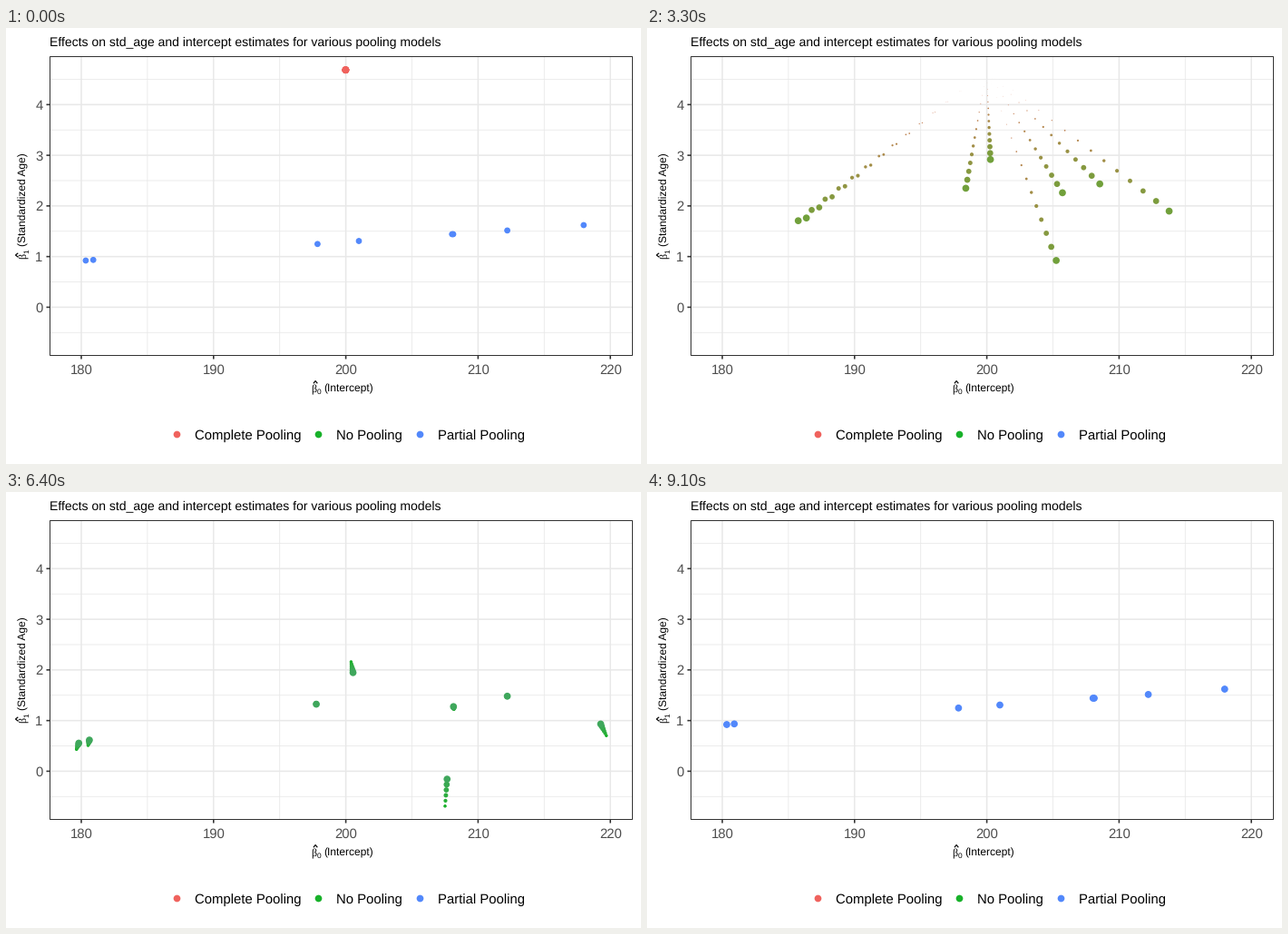
Recreate the animation shown at these times as a matplotlib script. Size 700 px wide and 480 px high, loop 10000 ms.

```python
import numpy as np
import matplotlib.pyplot as plt
from matplotlib.animation import FuncAnimation
from matplotlib.patches import Rectangle

plt.rcParams["text.hinting"] = "none"

W, H, DPI = 700, 480, 100
PX = 72 / DPI               # one pixel in points
FRAMES, STEP = 100, 100     # count, ms
HOLD, MOVE, WAKE = 20, 20, 15
DOT, GAMMA = 7.7, 1.8

RED, GREEN, BLUE = "#F0625D", "#18B12A", "#5288FB"
GRID, DARK, GREY = "#E8E8E8", "#333333", "#4D4D4D"

# Stage positions of the eight groups in each state
COMPLETE = np.tile([374.4, 46.2], (8, 1))
NONE = np.array([(77.7, 283.3), (90.5, 279), (341.6, 232.2), (380.4, 187),
                 (484, 345.8), (493.8, 239.3), (552.6, 225.4), (661.8, 268.2)])
PARTIAL = np.array([(87.9, 256), (96.2, 255.3), (343.4, 237.8), (389, 234.5),
                    (493, 227), (491.7, 227), (552.6, 222.9), (636.8, 217)])

TO_XYZ = np.array([[.4124, .3576, .1805], [.2126, .7152, .0722], [.0193, .1192, .9505]])
WHITE = TO_XYZ.sum(axis=1)


def to_lab(code):
    rgb = np.array([int(code[i:i + 2], 16) for i in (1, 3, 5)]) / 255
    f = np.cbrt(TO_XYZ @ rgb ** GAMMA / WHITE)
    return np.array([116 * f[1] - 16, 500 * (f[0] - f[1]), 200 * (f[1] - f[2])])


def to_rgb(lab):
    fy = (lab[0] + 16) / 116
    f = np.array([fy + lab[1] / 500, fy, fy - lab[2] / 200])
    return np.clip(np.linalg.solve(TO_XYZ, f ** 3 * WHITE), 0, 1) ** (1 / GAMMA)


POINTS = [COMPLETE, NONE, PARTIAL]
LABS = [to_lab(c) for c in (RED, GREEN, BLUE)]


def state(n):
    """Positions and colour of the groups at step n."""
    leg, k = divmod(n, HOLD + MOVE)
    p = max(0, k - HOLD + 1) / MOVE
    nxt = min(leg + 1, 2)
    pos = POINTS[leg] + (POINTS[nxt] - POINTS[leg]) * p
    lab = LABS[leg] + (LABS[nxt] - LABS[leg]) * p
    return pos, to_rgb(lab)


STATES = [state(n) for n in range(FRAMES)]

fig = plt.figure(figsize=(W / DPI, H / DPI), dpi=DPI, facecolor="white")
ax = fig.add_axes([0, 0, 1, 1])
ax.set(xlim=(0, W), ylim=(H, 0))
ax.axis("off")


def line(xs, ys, color, width, z=1):
    ax.plot(xs, ys, color=color, lw=width * PX, snap=False, zorder=z,
            solid_capstyle="butt", solid_joinstyle="miter")


def label(x, y, s, size, color="black", ha="left", font="Liberation Sans", rot=0):
    ax.text(x, y, s, fontsize=size * PX, color=color, ha=ha, va="baseline",
            family=font, rotation=rot, rotation_mode="anchor")


def px_x(v):
    return 83 + (v - 180) * 14.58


def px_y(v):
    return 307.4 - v * 55.76


L, R, T, B = 48.5, 690.5, 31.5, 360.5
for v in range(185, 220, 10):
    line([px_x(v)] * 2, [T, B], GRID, .8)
for v in np.arange(-.5, 5):
    line([L, R], [px_y(v)] * 2, GRID, .8)
for v in range(180, 221, 10):
    x = px_x(v)
    line([x, x], [T, B], GRID, 1.5, 2)
    line([x, x], [B, B + 4], DARK, 1.6, 2)
    label(x, 380.4, str(v), 14.85, GREY, "center")
for v in range(5):
    y = px_y(v)
    line([L, R], [y, y], GRID, 1.5, 2)
    line([L - 4, L], [y, y], DARK, 1.6, 2)
    label(40.5, y + 5.4, str(v), 14.85, GREY, "right")
ax.add_patch(Rectangle((L, T), R - L, B - T, fill=False, ec=DARK, lw=PX,
                       snap=False, zorder=6))

label(48.5, 20, "Effects on std_age and intercept estimates for various pooling models", 14)


def beta_title(place, rot, index, text):
    label(*place(0, 0), "β", 12, font="Liberation Serif", rot=rot)
    label(*place(6.2, 2.3), index, 8.4, rot=rot)
    label(*place(14, 0), text, 12, rot=rot)
    hat = [place(2.3, -9.7), place(4.5, -12.5), place(6.7, -9.7)]
    line(*zip(*hat), "black", 1.2)


beta_title(lambda u, v: (336.6 + u, 401 + v), 0, "0", "(Intercept)")
beta_title(lambda u, v: (23 + v, 254.5 - u), 90, "1", "(Standardized Age)")

area = (DOT * PX) ** 2
for x, tx, color, name in [(188, 208, RED, "Complete Pooling"),
                           (344.3, 364, GREEN, "No Pooling"),
                           (456.4, 476, BLUE, "Partial Pooling")]:
    ax.scatter([x], [447.4], s=area, c=color, lw=0)
    label(tx, 453, name, 14.85)

dots = ax.scatter([], [], lw=0, zorder=5)


def draw(n):
    ages = range(WAKE - 1, -1, -1)      # oldest first, current on top
    past = [STATES[(n - k) % FRAMES] for k in ages]
    scale = [(1 - k / WAKE) ** 2 for k in ages]
    dots.set_offsets(np.concatenate([pos for pos, _ in past]))
    dots.set_sizes(np.repeat(area * np.square(scale), 8))
    dots.set_facecolor(np.repeat([rgb for _, rgb in past], 8, axis=0))
    return dots,


anim = FuncAnimation(fig, draw, frames=FRAMES, interval=STEP, repeat=True, repeat_delay=0)
plt.show()
```
